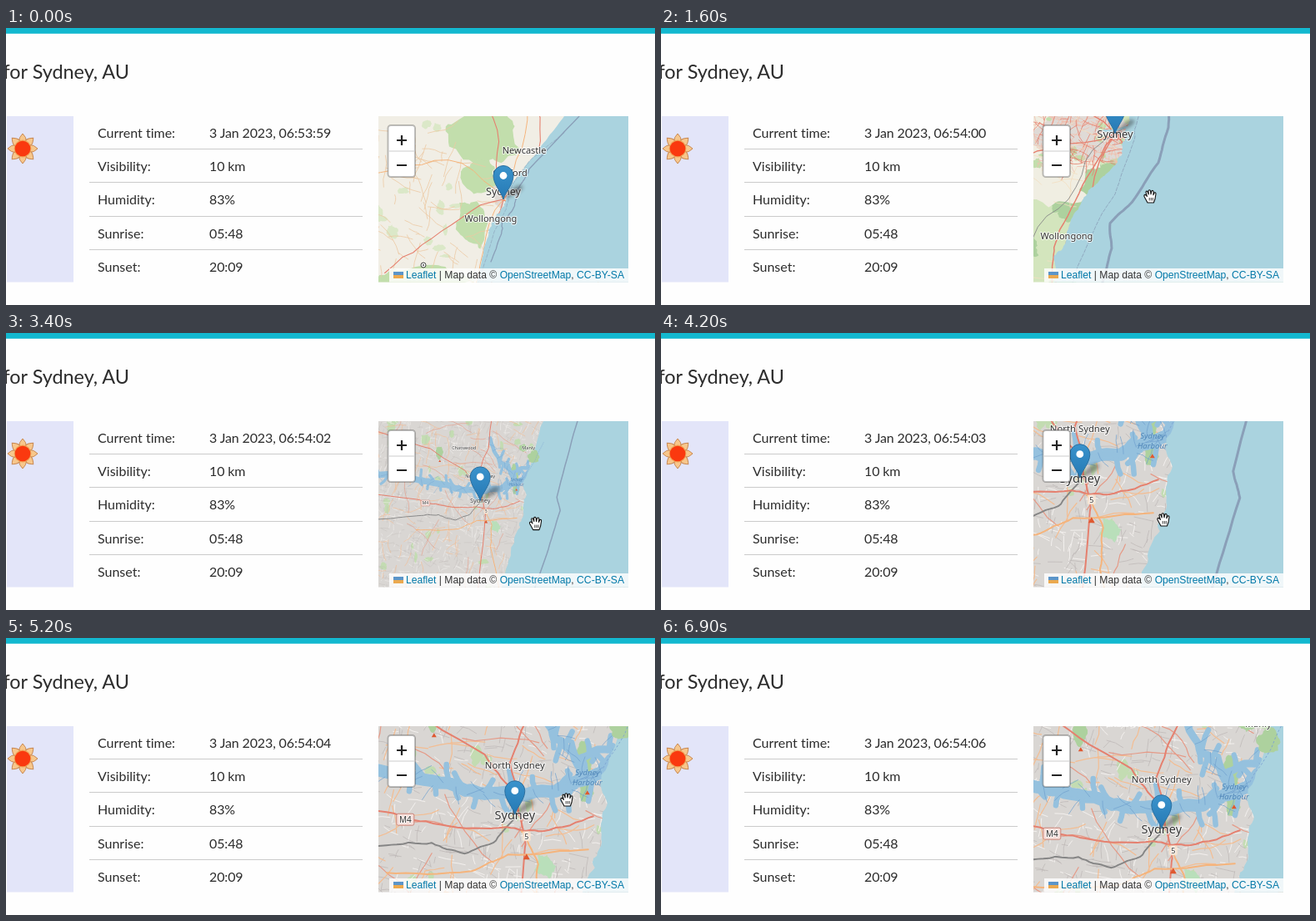
An HTML page for the animation above (7100 ms loop, 779 px wide and 333 px high).

```html
<!DOCTYPE html>
<html lang="en">
<head>
<meta charset="utf-8">
<title>Weather for Sydney</title>
<style>
html, body { margin: 0; width: 100%; height: 100%; overflow: hidden; background: #fefefe; }
svg { display: block; width: 100vw; height: 100vh; }
.page { font-family: Lato, sans-serif; font-size: 16px; fill: #2c2c2c; font-variant-ligatures: none; }
.value { letter-spacing: -.13px; }
.map { font-family: "Noto Sans", sans-serif; fill: #333; text-anchor: middle; }
.halo { paint-order: stroke; stroke: #fff; stroke-opacity: .75; stroke-width: 2.2px; stroke-linejoin: round; }
.water { font-style: italic; fill: #4f86b8; }
.park { font-style: italic; fill: #3f7040; }
.credit { font: 12.15px "Liberation Sans", Arial, sans-serif; fill: #333; }
.link { fill: #0078a8; }
</style>
</head>
<body>
<svg viewBox="0 0 779 333" preserveAspectRatio="none">
  <defs>
    <clipPath id="box"><rect x="447" y="106" width="300" height="199.5"/></clipPath>
    <filter id="soft" x="-50%" y="-50%" width="200%" height="200%"><feGaussianBlur stdDeviation="2"/></filter>
    <linearGradient id="blue" x1="0" y1="0" x2="0" y2="1">
      <stop offset="0" stop-color="#3a93cc"/><stop offset="1" stop-color="#2679b4"/>
    </linearGradient>
  </defs>
  <rect width="779" height="333" fill="#fefefe"/>
  <rect width="779" height="6.8" fill="#13b8cf"/>
  <g class="page">
    <text x="148" y="61" font-size="23.4" text-anchor="end">for Sydney, AU</text>
    <rect x="1" y="106" width="80" height="199.5" fill="#e3e5f9"/>
    <g id="sun" transform="translate(20 145)"></g>
    <g id="table"></g>
  </g>
  <g clip-path="url(#box)" class="map">
    <g id="far"></g>
    <g id="mid"></g>
    <g id="near"></g>
    <g id="pin">
      <path d="M0,0 C8,-9 13,-18 21,-17 C28,-15 19,-6 0,0Z" fill="#222" opacity=".4" filter="url(#soft)"/>
      <path d="M0,0 C-2.5,-9 -12,-18 -12,-28.5 A12,12 0 0 1 12,-28.5 C12,-18 2.5,-9 0,0Z" fill="url(#blue)" stroke="#2b6f9f"/>
      <circle cy="-28.5" r="4.4" fill="#fff"/>
    </g>
  </g>
  <g transform="translate(.5 0)">
    <rect x="458" y="117" width="32.5" height="62" rx="3.5" fill="#fff" stroke="#000" stroke-opacity=".25" stroke-width="2"/>
    <path d="M459,148H490" stroke="#ccc"/>
    <path d="M468.5,135H480.5M474.5,129V141M468.5,165H480.5" stroke="#222" stroke-width="2.2"/>
  </g>
  <rect x="460" y="289" width="287" height="16.5" fill="#fff" fill-opacity=".82"/>
  <path d="M465,293h12v4h-12z" fill="#5b95c9"/>
  <path d="M465,297h12v4h-12z" fill="#eba94f"/>
  <text class="credit" x="742" y="301" text-anchor="end"><tspan class="link">Leaflet</tspan> | Map data © <tspan class="link">OpenStreetMap</tspan>, <tspan class="link">CC-BY-SA</tspan></text>
  <g id="hand">
    <path fill="#fff" stroke="#111" stroke-width="1.1" stroke-linejoin="round"
      d="M-3,8 L-6.5,1.5 Q-8,-1 -6,-1.6 Q-4.6,-1.6 -3.6,.5 L-5,-4.4 Q-5,-6.4 -3.2,-5.6 L-1.8,-2 L-2,-6.4 Q-.6,-8 .5,-6.4 L1,-2 L1.9,-6 Q3.4,-7.4 4.2,-5.4 L3.9,-1.2 L5.2,-4 Q7,-4.8 7,-2.6 L6,3.5 L4.4,8Z"/>
    <path d="M-.8,2V5.5M1.3,2V5.5M3.3,2V5.5" stroke="#111" stroke-width=".8"/>
  </g>
</svg>
<script>
const $ = id => document.getElementById(id);
const LOOP = 7100, STEP = 100;
const SEA = '#aad3df', HARBOUR = '#95c1de', GREEN = '#c2deac', WOOD = '#add19e',
  LINE = '#8a9fb8', RED = '#e5806f', ORANGE = '#f5b47c';

let seed = 7;
const rnd = () => (seed = seed * 16807 % 2147483647) / 2147483647;
const spread = n => (rnd() - .5) * n;
const parse = (text, k = 1) => text.split(' ').map(p => p.split(',').map(v => v * k));
const path = pts => 'M' + pts.map(p => p.map(v => v.toFixed(1))).join('L');
const stroke = (d, color, width, more = '') =>
  `<path d="${d}" fill="none" stroke="${color}" stroke-width="${width}" stroke-linejoin="round" stroke-linecap="round" ${more}/>`;

// Midpoint displacement makes a few points into a ragged line.
function rough(pts, amp, rounds = 3) {
  while (rounds--) {
    pts = pts.flatMap((b, i) => {
      if (!i) return [b];
      const a = pts[i - 1], k = Math.min(amp, Math.hypot(b[0] - a[0], b[1] - a[1]) / 2);
      return [[(a[0] + b[0]) / 2 + spread(k), (a[1] + b[1]) / 2 + spread(k)], b];
    });
    amp /= 2;
  }
  return pts;
}
const road = (text, color, width) => stroke(path(rough(parse(text), 6)), color, width);

function blob(cx, cy, rx, ry, color) {
  const pts = Array.from({ length: 11 }, (_, i) => {
    const a = i * Math.PI * 2 / 11, r = .75 + rnd() * .5;
    return [cx + rx * r * Math.cos(a), cy + ry * r * Math.sin(a)];
  });
  return `<path d="${path(rough([...pts, pts[0]], Math.min(rx, ry) / 3, 2))}Z" fill="${color}"/>`;
}
function patches(count, cx, cy, w, h, size, color) {
  let out = '';
  while (count--) out += blob(cx + spread(w), cy + spread(h), size * (.3 + rnd()), size * (.3 + rnd()), color);
  return out;
}
function walk(x, y, angle, steps, len) {
  const pts = [[x, y]];
  while (steps--) {
    angle += spread(.7);
    pts.push([x += len * Math.cos(angle), y += len * Math.sin(angle)]);
  }
  return path(pts);
}
function streets(count, cx, cy, w, h, len, color, width, steps = 2) {
  let d = '';
  while (count--)
    d += walk(cx + spread(w), cy + spread(h), .25 + Math.floor(rnd() * 4) * Math.PI / 2 + spread(.6), steps, len * (.3 + rnd()) / steps);
  return stroke(d, color, width);
}
function spokes(count, reach, color, width) {
  let d = '';
  for (let i = 0; i < count; i++) d += walk(0, 0, (i + .3 * rnd()) * Math.PI * 2 / count + .2, 12, reach / 12);
  return stroke(d, color, width);
}

// One geography in units of the middle level, shared by all three.
const COAST = '292,-400 168,-232 71,-116 46,-82 24,-57 21,-37 18,-22 13,-6 13,3 12,8 9,17 3,34 -16,53 -33,72 -50,98 -60,133 -73,147 -72,175 -104,296 -160,480';
const OUTER = '364,-400 124,-146 91,-82 66,-45 64,-7 52,35 20,83 -6,108 -4,138 -15,179 -60,300';
const INNER = '292,-320 130,-190 73,-116 44,-72 28,-20 23,-1 24,3 20,16 0,73 -15,95 -45,160 -120,400';
function sea(k, ragged, outer, inner, dash) {
  const shore = rough(parse(COAST, k), ragged, 4);
  return `<path d="${path(shore)}L${-160 * k},${900 * k}H${900 * k}V${-900 * k}H${292 * k}Z" fill="${SEA}"/>` +
    stroke(path(rough(parse(OUTER, k), 2)), LINE, outer) +
    stroke(path(rough(parse(INNER, k), 2)), LINE, inner, dash ? 'stroke-dasharray="4 2"' : '');
}
const land = color => `<rect x="-1500" y="-1500" width="3000" height="3000" fill="${color}"/>`;
const label = (x, y, text, size = 11, kind = 'halo') =>
  `<text x="${x}" y="${y}" font-size="${size}" class="${kind}">${text}</text>`;

function inlet(text, width, bays) {
  const axis = rough(parse(text), 12), n = axis.length;
  let d = path(axis), fine = '';
  for (let i = 0; i < bays; i++) {
    const [x, y] = axis[Math.floor(i * n / bays)];
    d += walk(x, y, (i % 2 ? 1 : -1) * (1.57 + spread(.9)), 3, 5 + rnd() * 5);
    fine += walk(x + spread(14), y + spread(14), spread(6), 3, 7);
  }
  return stroke(path(axis), HARBOUR, width) + stroke(d, HARBOUR, 6.5) + stroke(fine, '#6f9fcd', .7);
}

$('far').innerHTML = land('#f1eee5') +
  patches(26, -95, 0, 130, 200, 7, '#dbe8c8') +
  blob(-22, -75, 40, 36, GREEN) + blob(-28, -28, 24, 20, GREEN) +
  blob(-38, 28, 20, 28, GREEN) + blob(-100, 96, 52, 18, GREEN) + blob(-4, -5, 9, 13, '#dfdad5') +
  streets(70, -90, 10, 130, 200, 34, '#ecc9a4', .8, 4) +
  spokes(5, 170, RED, 1.1) + spokes(4, 200, ORANGE, 1) +
  sea(.25, 4, 1.3, .6, true) +
  '<circle cx="-96" cy="79" r="3" fill="#fff" stroke="#444"/><circle cx="-96" cy="79" r="1" fill="#444"/>' +
  label(25, -55, 'Newcastle') + label(8, -28, 'Gosford') + label(0, -5, 'Sydney', 12.5) + label(-15, 27, 'Wollongong');

$('mid').innerHTML = land('#d3e5bd') +
  blob(-260, -30, 150, 110, GREEN) + patches(30, -110, 20, 260, 380, 16, WOOD) +
  blob(-30, -108, 66, 34, GREEN) + blob(-74, 22, 50, 84, '#f0eee2') + blob(-34, -4, 62, 42, '#dfdad6') +
  blob(-20, 62, 22, 20, WOOD) + patches(18, -50, 0, 120, 90, 5, GREEN) +
  streets(190, -44, 0, 112, 80, 15, '#f0bfae', .8) +
  streets(80, -40, 0, 104, 76, 26, RED, .8, 4) +
  streets(50, -110, 60, 200, 260, 40, '#f3dfc0', .8, 5) +
  spokes(7, 230, RED, 1.4) + spokes(3, 200, '#888', .9) +
  stroke(walk(-132, -80, 1.6, 8, 14), '#77a9cf', 1.4) +
  road('-84,230 -74,150 -66,115 -28,44 0,0', RED, 1.5) +
  sea(1, 6, 3, .8, true) +
  stroke(walk(18, -8, 3, 4, 8) + walk(30, -58, 3.2, 4, 8) + walk(46, -88, 3, 3, 8), SEA, 3) +
  ['Blue Mountains', 'National', 'Park'].map((s, i) => label(-132, -63 + i * 12, s, 10, 'park')).join('') +
  label(24, -93, 'Gosford') + label(-58, 127, 'Wollongong') + label(0, 5, 'Sydney', 13);

$('near').innerHTML = land('#d9d6d3') +
  patches(110, -60, 0, 820, 640, 10, '#c3dcb2') +
  streets(1500, -60, 0, 800, 620, 17, '#f3f0ee', 1) +
  streets(1500, -60, 0, 800, 620, 18, '#bcb7b5', .7) +
  streets(300, -60, 60, 800, 520, 40, '#f3bd92', 1.2, 4) +
  streets(70, -60, 0, 800, 620, 80, '#e59a87', 1.2, 6) +
  blob(82, -70, 13, 17, WOOD) + blob(-98, -114, 9, 15, WOOD) + blob(86, -26, 8, 10, WOOD) + blob(36, 62, 11, 14, '#b9dfba') +
  inlet('116,-66 92,-44 50,-28 -20,-26 -80,-38 -150,-50 -300,-66', 15, 30) +
  inlet('112,-78 76,-66 48,-94 24,-150', 9, 12) +
  road('-400,60 -154,37 -100,34 -60,47 -26,34 2,2', '#858585', 1.9) +
  road('-400,-40 -154,-3 -90,12 -10,15 34,20 94,2', RED, 2) +
  road('-260,-170 -120,-125 -36,-72 -2,-30 4,0', RED, 2) +
  road('40,-300 20,-125 -6,-62 5,0 12,40 -10,300', RED, 2) +
  road('-154,70 -52,68 -8,48 88,42', ORANGE, 2) +
  road('8,20 28,60 24,110 46,220', ORANGE, 2) +
  sea(8, 18, 5, 3) +
  blob(128, -104, 12, 16, WOOD) + blob(103, -126, 9, 9, WOOD) +
  stroke(walk(106, -56, -1.4, 8, 12), '#7da3d3', .9, 'stroke-dasharray="2 3"') +
  '<rect x="-142" y="-1" width="21" height="14" rx="2" fill="#f6ddd8" stroke="#c98479"/>' +
  '<rect x="9" y="20" width="10" height="12" rx="2" fill="#fae8d4" opacity=".8"/>' +
  '<path d="M10,54l4,-7l4,7zM-100,-93l3,-5l3,5zM84,-24l3,-5l3,5z" fill="#df5931"/>' +
  label(-131.5, 10, 'M4', 10) + label(14, 30, '5', 9) +
  label(87, -47, 'Sydney', 9.5, 'water') + label(87, -35, 'Harbour', 9.5, 'water') +
  label(-39, -123, 'Chatswood') + label(116, -122, 'Manly') +
  label(0, -55, 'North Sydney', 11.3) + label(0, 6, 'Sydney', 14.5);

$('sun').innerHTML = Array.from({ length: 8 }, (_, i) =>
  `<path d="M-4.5,-9 Q-4.5,-13.5 0,-18 Q4.5,-13.5 4.5,-9Z" transform="rotate(${i * 45})" fill="#f7c78c" stroke="#c98a55"/>`
).join('') + '<circle r="10.4" fill="#f0a055"/><circle r="9.3" fill="#fa390f"/>';

const rows = { 'Current time': '', Visibility: '10 km', Humidity: '83%', Sunrise: '05:48', Sunset: '20:09' };
$('table').innerHTML = Object.entries(rows).map(([name, value], i) => {
  const y = Math.round(131.8 + i * 40.3), rule = Math.round(145 + i * 40.4) + .5;
  return `<text x="110" y="${y}">${name}:</text><text class="value" x="244" y="${y}">${value}</text>` +
    (i < 4 ? `<path d="M100,${rule}H428" stroke="#cbcbcb"/>` : '');
}).join('');
const clock = document.querySelector('.value');

// The hand's actions; it glides in a straight line from one to the next.
const rest = (from, to, x, y) => ({ from, to, x, y, dx: 0, dy: 0 });
const drag = (from, to, x, y, dx, dy) => ({ from, to, x, y, dx, dy, pans: true });
const zoom = (from, to, x, y) => ({ ...rest(from, to, x, y), zooms: true });
const actions = [
  rest(200, 200, 740, 345),
  zoom(600, 1000, 607.5, 224.8), zoom(1000, 1200, 607.5, 224.8),
  drag(1300, 1600, 607.5, 224.8, -20.5, -22.8), drag(1600, 2100, 587, 202, 74, 95),
  rest(2300, 2600, 641, 229),
  ...[2700, 3100, 3500].map(t => zoom(t, t + (t < 3500 ? 300 : 400), 635.6, 228.6)),
  rest(4100, 4200, 603, 224),
  drag(4500, 5200, 565, 156, 108, 38), drag(5500, 5900, 684, 177, -10, 17),
  rest(6100, 6100, 673, 194), rest(6300, 6300, 800, 290)
];
const clamp = v => Math.max(0, Math.min(1, v));
const mix = (a, b, f) => a + (b - a) * f;

function pose(t) {
  let x = 597, y = 206, scale = 1, hx = 740, hy = 345, end = 0;
  for (const a of actions) {
    const glide = clamp((t - end) / (a.from - end || 1));
    if (t >= end) {
      hx = t >= a.from ? a.x : mix(hx, a.x, glide);
      hy = t >= a.from ? a.y : mix(hy, a.y, glide);
    }
    if (t < a.from) break;
    const f = clamp((t - a.from) / (a.to - a.from || 1));
    hx += a.dx * f;
    hy += a.dy * f;
    if (a.pans) { x += a.dx * f; y += a.dy * f; }
    if (a.zooms) { x += (x - a.x) * f; y += (y - a.y) * f; scale *= 1 + f; }
    if (t < a.to) break;
    end = a.to;
  }
  return { x, y, scale, hx, hy };
}

function level(id, x, y, scale, alpha) {
  const g = $(id);
  g.style.display = alpha > 0 ? '' : 'none';
  g.setAttribute('opacity', alpha);
  g.setAttribute('transform', `translate(${x} ${y}) scale(${scale})`);
}
function draw(t) {
  const { x, y, scale, hx, hy } = pose(t);
  const mid = clamp(scale / 2 - 1), near = clamp(scale / 8 - 1);
  level('far', x, y, scale, mid < 1 ? 1 : 0);
  level('mid', x, y, scale / 4, near < 1 ? mid : 0);
  level('near', x, y, scale / 32, near);
  $('pin').setAttribute('transform', `translate(${x} ${y})`);
  $('hand').setAttribute('transform', `translate(${hx} ${hy})`);
  const sec = 59 + Math.floor((t + 100) / 1000);
  clock.textContent = `3 Jan 2023, 06:${53 + Math.floor(sec / 60)}:${String(sec % 60).padStart(2, '0')}`;
}

let last = -1;
function tick() {
  const t = Math.floor(performance.now() % LOOP / STEP) * STEP;
  if (t !== last) draw(last = t);
  requestAnimationFrame(tick);
}
tick();
</script>
</body>
</html>
```
